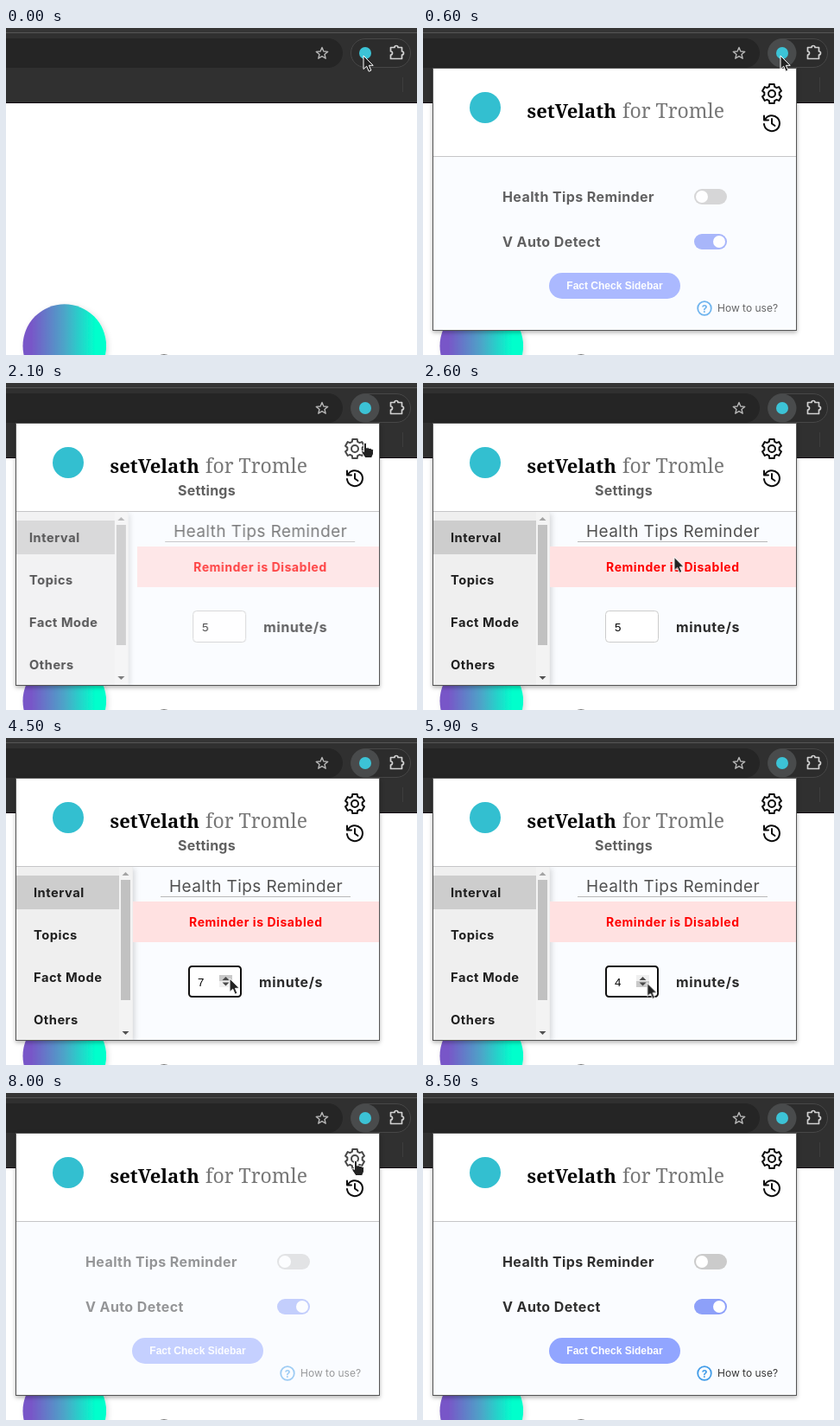
Recreate the animation shown at these times as an HTML page. Size 476 by 378 pixels, loop 8.6 s.

```html
<!DOCTYPE html>
<html lang="en">
<head>
<meta charset="utf-8">
<title>Extension popup</title>
<style>
  html, body { margin: 0; width: 100%; height: 100%; overflow: hidden; background: #fff; }
  svg { display: block; width: 476px; height: 378px; }
  text { font-family: Inter, sans-serif; white-space: pre; }
  .line { fill: none; stroke-linecap: round; stroke-linejoin: round; }
  .label { font-weight: 700; font-size: 16px; letter-spacing: .4px; fill: #2b2b2b; }
  .menu { font-weight: 700; font-size: 14.7px; letter-spacing: .5px; fill: #1f1f1f; }
  .slab { font-family: "Noto Serif", serif; }
  .plain { font-family: "Liberation Sans", Arial, sans-serif; }
  .timed { opacity: 0; }
</style>
</head>
<body>
<svg viewBox="0 0 476 378">
  <defs>
    <linearGradient id="bubble">
      <stop offset=".1" stop-color="#7856c8"/>
      <stop offset=".5" stop-color="#4ca5c8"/>
      <stop offset=".87" stop-color="#00ffcc"/>
    </linearGradient>
    <filter id="shadow" x="-20%" y="-20%" width="140%" height="140%">
      <feDropShadow dx="0" dy="2" stdDeviation="2.5" flood-opacity=".3"/>
    </filter>
    <filter id="glow" x="-20%" y="-20%" width="140%" height="140%">
      <feDropShadow dx="2" dy="2" stdDeviation="3" flood-opacity=".15"/>
    </filter>
    <clipPath id="body"><rect x="12" y="149" width="420" height="200"/></clipPath>
  </defs>

  <!-- page -->
  <rect width="476" height="378" fill="#fff"/>
  <circle cx="67.800" cy="367.500" r="48.300" fill="url(#bubble)" filter="url(#glow)"/>
  <circle cx="183" cy="388" r="10.500" fill="none" stroke="#777"/>

  <!-- browser bar -->
  <rect width="476" height="87" fill="#303030"/>
  <rect width="476" height="5" fill="#353535"/>
  <rect y="5" width="476" height="1" fill="#555"/>
  <rect y="86" width="476" height="1" fill="#100a10"/>
  <rect x="-30" y="12" width="420" height="34" rx="17" fill="#252525"/>
  <path class="line" d="M366 22.500l1.900 4.500 4.800.4-3.700 3.100 1.200 4.700-4.200-2.500-4.200 2.500 1.200-4.700-3.700-3.100 4.800-.4z" stroke="#b5b5b5" stroke-width="1.400"/>
  <rect x="399.500" y="12.500" width="69" height="33" rx="16.500" fill="#2c2c2c" stroke="#474747"/>
  <circle id="pressed" class="timed" cx="416" cy="29" r="16.500" fill="#494b4c"/>
  <circle cx="416" cy="29" r="7" fill="#3cc3d6"/>
  <path class="line" d="M445.500 22.500h4.500a2 2 0 0 1 4 0h4.500v4.500a2 2 0 0 1 0 4v4.500h-13v-4.500a2 2 0 0 0 0-4z" stroke="#d2d2d2" stroke-width="1.700"/>
  <rect x="459" y="57" width="1" height="17" fill="#3d3d3d"/>

  <!-- popup -->
  <g id="popup" class="timed">
    <rect x="11.500" y="46.500" width="421" height="303" fill="#fff" stroke="#555" filter="url(#shadow)"/>
    <rect x="12" y="149" width="420" height="200" fill="#fafcff"/>
    <rect x="12" y="148" width="420" height="1" fill="#c6c6c8"/>
    <circle cx="72" cy="92" r="18" fill="#33bfd0"/>
    <text class="slab" x="120.500" y="104" font-size="22" font-weight="700" fill="#050505">setVelath</text>
    <text class="slab" x="231" y="104" font-size="23" fill="#777">for Tromle</text>
    <text id="heading" class="label timed" x="199" y="130" style="fill:#606060;letter-spacing:.25px">Settings</text>
    <g id="gear" class="line" stroke="#0c0c0c" stroke-width="2">
      <path id="teeth"/>
      <circle cx="404" cy="76" r="4"/>
    </g>
    <path class="line" d="M396 106a9 9 0 1 1-1 5M395 101.500v5h5M404 105v5.500l3.500 2.500" stroke="#0c0c0c" stroke-width="2"/>

    <g id="home" class="timed">
      <text class="label" x="92" y="201">Health Tips Reminder</text>
      <rect x="314" y="186" width="38" height="18" rx="9" fill="#cacaca"/>
      <circle cx="323" cy="195" r="7" fill="#fff"/>
      <text class="label" x="92" y="253">V Auto Detect</text>
      <rect x="314" y="238" width="38" height="18" rx="9" fill="#8b9ef9"/>
      <circle cx="343" cy="247" r="7" fill="#fff"/>
      <rect x="146" y="283" width="152" height="30" rx="15" fill="#8fa3ff"/>
      <text class="plain" x="222" y="302" font-size="12" font-weight="700" text-anchor="middle" fill="#fff">Fact Check Sidebar</text>
      <circle cx="326" cy="324" r="7.800" fill="none" stroke="#3f9be8" stroke-width="1.800"/>
      <text x="326" y="328.500" font-size="12" font-weight="700" text-anchor="middle" fill="#3f9be8">?</text>
      <text x="341" y="328" font-size="12" fill="#333">How to use?</text>
    </g>

    <g clip-path="url(#body)">
      <g id="settings" class="timed">
        <g id="sidebar">
          <rect x="-20" y="149" width="167" height="200" fill="#efefef" filter="url(#glow)"/>
          <rect x="-20" y="159" width="151" height="39" fill="#cdcdcd"/>
          <text class="menu" x="32" y="184">Interval</text>
          <text class="menu" x="32" y="233">Topics</text>
          <text class="menu" x="32" y="282">Fact Mode</text>
          <text class="menu" x="32" y="331">Others</text>
          <rect x="131" y="149" width="15" height="200" fill="#f3f3f3"/>
          <rect x="133" y="164" width="11" height="139" fill="#c1c1c1"/>
          <path d="M134.500 159l4-4 4 4z" fill="#a3a3a3"/>
          <path d="M134.500 339l4 4 4-4z" fill="#505050"/>
        </g>
        <g id="content">
          <text x="189" y="178" font-size="19" letter-spacing=".4" fill="#505050">Health Tips Reminder</text>
          <rect x="179" y="183" width="220" height="1" fill="#b8b8b8"/>
          <rect x="147" y="189" width="310" height="47" fill="#ffe1e1"/>
          <text x="289.300" y="218" font-size="14" font-weight="700" letter-spacing=".55" text-anchor="middle" fill="#f00">Reminder is Disabled</text>
          <rect x="211.500" y="263.500" width="61" height="36" rx="4" fill="#fff" stroke="#ccc"/>
          <rect id="focus" class="timed" x="212" y="264" width="60" height="35" rx="3.500" fill="none" stroke="#101010" stroke-width="2"/>
          <g id="value"></g>
          <g id="spinner" class="timed">
            <rect x="247" y="274" width="15" height="14" fill="#efefef"/>
            <rect id="upHover" class="timed" x="247" y="274" width="15" height="7" fill="#c9c9c9"/>
            <rect id="upPress" class="timed" x="247" y="274" width="15" height="7" fill="#a8a8a8"/>
            <rect id="downHover" class="timed" x="247" y="281" width="15" height="7" fill="#c9c9c9"/>
            <rect id="downPress" class="timed" x="247" y="281" width="15" height="7" fill="#a8a8a8"/>
            <path d="M250.500 280l4-4 4 4zM250.500 282.500l4 4 4-4z" fill="#4a4a4a"/>
          </g>
          <text class="label" x="293" y="288" style="letter-spacing:.6px">minute/s</text>
        </g>
      </g>
    </g>
  </g>

  <g id="cursor" fill="#222" stroke="#fff" stroke-linejoin="round">
    <path id="arrow" class="timed" d="M0 0v15.500l3.700-3.300 2.500 6 2.700-1.200-2.500-5.700h4.800z"/>
    <path id="hand" class="timed" d="M-1.500 1Q0-1 1.500 1v5q2-1 3 .5 2-.8 2.700.8 2-.4 2.300 1.400v4.300l-2 4.500h-7.500l-3.700-5.500q-1.500-2.500.3-3l1.900 1.500z"/>
  </g>
</svg>
<script>
const LOOP = 8600, HOLD = 'steps(1, end)', SETTLE = 'ease-out';
const $ = id => document.getElementById(id);

// Frames are [ms, style, easing towards the next frame].
function loop(el, frames) {
  el.animate(
    frames.map(([ms, style, easing = 'linear']) => ({ offset: ms / LOOP, easing, ...style })),
    { duration: LOOP, iterations: Infinity });
}

// Makes an element visible only during the given [from, to] spans.
function show(el, ...spans) {
  const frames = spans[0][0] > 0 ? [[0, { opacity: 0 }, HOLD]] : [];
  for (const [from, to] of spans)
    frames.push([from, { opacity: 1 }, HOLD], [to, { opacity: 0 }, HOLD]);
  if (frames.at(-1)[0] < LOOP) frames.push([LOOP, { opacity: 0 }]);
  loop(el, frames);
}

const fade = (el, frames) => loop(el, frames.map(([ms, opacity, easing]) => [ms, { opacity }, easing]));
const move = (el, frames) => loop(el, frames.map(([ms, x, y, easing]) =>
  [ms, { transform: `translate(${x}px, ${y}px)` }, easing]));

const teeth = [];
for (let i = 0; i < 6; i++)
  for (const [turn, radius] of [[-.35, 8.8], [-.23, 11.4], [.23, 11.4], [.35, 8.8]]) {
    const angle = (i + turn) * Math.PI / 3;
    teeth.push([404 + radius * Math.sin(angle), 76 - radius * Math.cos(angle)].map(n => n.toFixed(2)));
  }
$('teeth').setAttribute('d', `M${teeth.join('L')}Z`);

show($('pressed'), [100, LOOP]);
show($('popup'), [100, LOOP]);
show($('heading'), [1600, 7700]);
fade($('home'), [[0, 0, HOLD], [100, 0, SETTLE], [1000, 1, HOLD], [1600, 0, HOLD], [7700, 0, SETTLE], [LOOP, 1]]);
fade($('settings'), [[0, 0, HOLD], [1600, 0, SETTLE], [2500, 1, HOLD], [7700, 0, HOLD], [LOOP, 0]]);
for (const [id, start] of [['sidebar', -20], ['content', 20]])
  move($(id), [[0, start, 0], [1600, start, 0, SETTLE], [2500, 0, 0], [LOOP, 0, 0]]);
fade($('gear'), [[0, 1], [1100, 1], [1400, .75], [2450, .75], [2600, 1], [7250, 1], [7500, .75], [8300, .75], [8400, 1], [LOOP, 1]]);

const values = [[0, 5], [3800, 6], [3900, 7], [5100, 6], [5300, 5], [5400, 4], [6500, 5], [6600, 6]];
values.forEach(([from, digit], i) => {
  const text = document.createElementNS('http://www.w3.org/2000/svg', 'text');
  text.setAttribute('class', 'plain timed');
  text.setAttribute('x', 222);
  text.setAttribute('y', 286.5);
  text.setAttribute('font-size', 13.33);
  text.textContent = digit;
  $('value').append(text);
  show(text, [from, values[i + 1]?.[0] ?? LOOP]);
});
show($('focus'), [3800, LOOP]);
show($('spinner'), [2900, LOOP]);
show($('upHover'), [3250, 4700], [5950, 6800]);
show($('upPress'), [3800, 4100], [6500, 6650]);
show($('downHover'), [2900, 3250], [4700, 5950]);
show($('downPress'), [5100, 5600]);

show($('arrow'), [0, 1150], [2500, 7100]);
show($('hand'), [1150, 2500], [7100, 8400]);
move($('cursor'), [
  [0, 414, 32], [900, 414, 32], [1200, 416, 69], [2400, 416, 69],
  [2600, 291, 201], [2900, 260, 287], [3100, 260, 287], [3300, 259, 278],
  [4500, 259, 278], [4800, 260, 286], [5800, 260, 286], [6100, 259, 278],
  [6700, 259, 278, 'ease-in-out'], [7200, 398, 89], [7500, 405, 78], [LOOP, 405, 78]
]);
</script>
</body>
</html>
```
